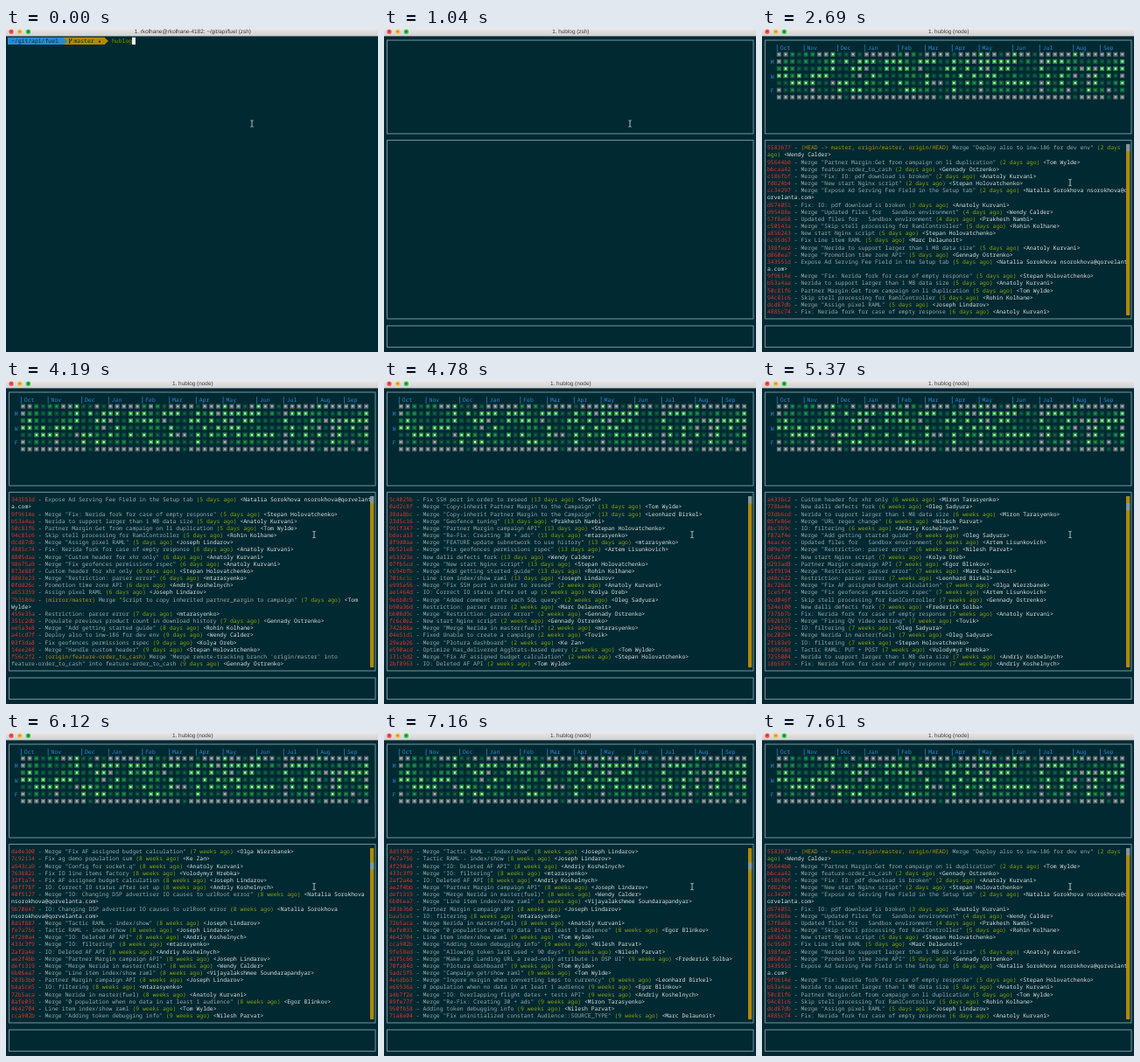
An HTML page for the animation above (8000 ms loop, 425 by 371 pixels).

```html
<!DOCTYPE html>
<html lang="en">
<head>
<meta charset="utf-8">
<title>hublog</title>
<style>
  html, body { margin: 0; width: 100%; height: 100%; overflow: hidden; background: #012932; }
  svg { display: block; width: 425px; height: 371px; }
  text { white-space: pre; text-rendering: geometricPrecision; }
  .mono { font: 6.42px "Noto Sans Mono", "DejaVu Sans Mono", monospace; }
  .bar { font: 6.4px "Liberation Sans", Arial, sans-serif; fill: #3c3c3c; text-anchor: middle; }
</style>
</head>
<body>
<svg viewBox="0 0 425 371" xmlns="http://www.w3.org/2000/svg">
  <defs>
    <linearGradient id="chrome" x2="0" y2="1">
      <stop stop-color="#eaeaea"/><stop offset="1" stop-color="#d0d0d0"/>
    </linearGradient>
  </defs>
  <rect width="425" height="371" fill="#012932"/>
  <rect width="425" height="9.4" fill="url(#chrome)"/>
  <circle cx="6" cy="4.2" r="2.7" fill="#fc5753"/>
  <circle cx="15.8" cy="4.2" r="2.7" fill="#fdbc40"/>
  <circle cx="25.4" cy="4.2" r="2.7" fill="#33c748"/>
  <path d="M5 3.2L7 5.2M7 3.2L5 5.2M14.4 4.2H17.2M24 4.2H26.8M25.4 2.8V5.6" stroke="#000" stroke-opacity=".55" stroke-width=".7"/>
  <text id="title" class="bar" x="213.3" y="6.3"></text>
  <g id="prompt" class="mono">
    <path d="M65 10.8H112.5L117 14.9L112.5 19H65Z" fill="#b58900"/>
    <path d="M2 10.8H65.5L70 14.9L65.5 19H2Z" fill="#268bd2"/>
    <g fill="#06303b">
      <text x="6" y="17">~/git/api/fuel</text>
      <text x="77.5" y="17">master</text>
      <text x="105" y="17">★</text>
    </g>
    <path d="M72.6 12V18M74.8 12V14L72.6 16" fill="none" stroke="#06303b" stroke-width=".9"/>
    <text x="121" y="17" fill="#859900">hublog</text>
    <rect id="caret" width="4" height="8.2" fill="#eef0ea"/>
  </g>
  <g id="panes" fill="none" stroke="#6b8d94" stroke-width="1.1">
    <rect x="3.5" y="14" width="418.5" height="107"/>
    <rect x="3.5" y="128.5" width="418.5" height="204.5"/>
    <rect x="3.5" y="341" width="418.5" height="24.5"/>
  </g>
  <g id="data" class="mono">
    <g id="grid"></g>
    <g id="log"></g>
    <rect x="416" y="133" width="4.2" height="196" fill="#b08a08"/>
    <rect id="thumb" x="416" width="4.2" height="8.17" fill="#7f97a0"/>
  </g>
  <path id="mouse" d="M-1.6 -3.6H-.5L0 -3L.5 -3.6H1.6M0 -3V3M-1.6 3.6H-.5L0 3L.5 3.6H1.6" fill="none" stroke="#dfe5e5" stroke-width=".8"/>
</svg>
<script>
const $ = id => document.getElementById(id);
const LOOP = 8000, PITCH = 7.69, ROW = 8.17, ROWS = 24, COLS = 107;

let seed = 41;
const rnd = () => (seed = (seed * 16807) % 2147483647) / 2147483647;
const pick = list => list[Math.floor(rnd() * list.length)];
const esc = s => s.replace(/&/g, '&amp;').replace(/</g, '&lt;').replace(/>/g, '&gt;');

const people = {
  WC: 'Wendy Calder', TW: 'Tom Wylde', GO: 'Gennady Ostrenko', AK: 'Anatoly Kurvani',
  SH: 'Stepan Holovatchenko', NS: 'Natalia Sorokhova nsorokhova@qorvelanta.com',
  PN: 'Prakhesh Nambi', RK: 'Rohin Kolhane', MD: 'Marc Delaunoit', JL: 'Joseph Lindarov',
  mt: 'mtarasyenko', AN: 'Andriy Koshelnych', KO: 'Kolya Oreb', OS: 'Oleg Sadyura',
  NP: 'Nilesh Parvat', EB: 'Egor Blinkov', AL: 'Artem Lisunkovich', TV: 'Tovik',
  OW: 'Olga Wierzbanek', KZ: 'Ke Zan', VH: 'Volodymyr Hrebka',
  VS: 'Vijayalakshmee Soundarapandyar', FS: 'Frederick Solba', LB: 'Leonhard Birkel',
  MT: 'Miron Tarasyenko'
};

// hash, subject ~ age ~ author; a leading * wraps the subject as a merge
const recent = `5583b77 (HEAD -> master, origin/master, origin/HEAD) *Deploy also to inw-186 for dev env~2 days~WC
95644b0 *Partner Margin:Get from campaign on li duplication~2 days~TW
bbcaa42 Merge feature-order_to_cash~2 days~GO
c186fbf *Fix: IO: pdf download is broken~2 days~AK
fdb24b4 *New start Nginx script~2 days~SH
cc34297 *Expose Ad Serving Fee Field in the Setup tab~2 days~NS
d574051 Fix: IO: pdf download is broken~3 days~AK
d95488e *Updated files for   Sandbox environment~4 days~WC
57f8e68 Updated files for   Sandbox environment~4 days~PN
c50143a *Skip stell processing for RamlController~5 days~RK
a856243 New start Nginx script~5 days~SH
6c95d67 Fix Line item RAML~5 days~MD
398fee2 *Nerida to support larger than 1 MB data size~5 days~AK
d860ea7 *Promotion time zone API~5 days~GO
343551d Expose Ad Serving Fee Field in the Setup tab~5 days~NS
9f9614e *Fix: Nerida fork for case of empty response~5 days~SH
b53a4aa Nerida to support larger than 1 MB data size~5 days~AK
50c81f6 Partner Margin:Get from campaign on li duplication~5 days~TW
94c81c6 Skip stell processing for RamlController~5 days~RK
dcd87db *Assign pixel RAML~5 days~JL
4885c74 Fix: Nerida fork for case of empty response~6 days~AK
8805daa *Custom header for xhr only~6 days~AK
98675a9 *Fix geofences permissions rspec~6 days~AK
873e88f Custom header for xhr only~6 days~SH
8083e23 *Restriction: parser error~6 days~mt
0fdd26c Promotion time zone API~6 days~AN
a653359 Assign pixel RAML~6 days~JL
79350de (mirror/master) *Script to copy inherited partner_margin to campaign~7 days~TW
459e35a Restriction: parser error~7 days~mt
351c2db Populate previous product count in download history~7 days~GO
ee5a3e8 *Add getting started guide~8 days~RK
a41cd7f Deploy also to inw-186 for dev env~9 days~WC
03f3da8 Fix geofences permissions rspec~9 days~KO
14ee248 *Handle custom header~9 days~SH
f56c2f2 (origin/feature-order_to_cash) Merge "Merge remote-tracking branch 'origin/master' into feature-order_to_cash" into feature-order_to_cash~9 days~GO`;

const middle = `00e642c Fixed Unable to create a campaign~4 weeks~AK
01563bb IO: Add "QRDC Last Updated Date" column~4 weeks~GO
fbf5840 Fixed SSO authorization~4 weeks~OS
f03afa7 Fixing the targer restrictions due to nerida~4 weeks~NP
533b267 Fix the SSO signin issue caused by nerida~4 weeks~NP
1ac443d *Fix SSH port in order to reseed~4 weeks~MD
9a6662f Dune new staging Colvaro endpoint~4 weeks~SH
cc03ee0 Fix SSH port in order to reseed~4 weeks~MD
19118a5 Tactic RAML: PUT + POST~4 weeks~JL
5f2bde9 Site targeting: remove duplicate values on backend validation~4 weeks~GO
5315f49 Optimize has_delivered AggStats-based query~4 weeks~KO
a2b714f New dalli defects fork~4 weeks~KO
dbcd086 *Applying Nerida on all actions of all controllers~5 weeks~NP
943535d *Added comment into each SQL query~5 weeks~OS
f4a1d4c *URL regex change~5 weeks~mt
8519682 *Fixing QV Video editing~5 weeks~EB
17ee3c3 *FEATURE update subnetwork to use history~5 weeks~RK
83a4a4f *Copy-inherit Partner Margin to the Campaign~5 weeks~JL
42d84bf Fixing QV Video editing~5 weeks~AL
31b7ad0 *QVX Pre-Bid Phase 2: Rate Card~5 weeks~AN
400dbc8 URL regex change~5 weeks~mt
b0be294 *Fix gateway for 204s~5 weeks~TV
176a2ab Fix gateway for 204s~5 weeks~TV
a19d94b *Geofence tuning~5 weeks~EB`;

const older = `da0e300 *Fix AF assigned budget calculation~7 weeks~OW
7c92114 Fix ag demo population sum~8 weeks~KZ
a543ca9 *Config for socket.q~8 weeks~AK
7638821 Fix IO line items factory~8 weeks~VH
32f1a74 Fix AF assigned budget calculation~8 weeks~JL
48ff78f IO: Correct IO status after set up~8 weeks~AN
40f5127 *IO: Changing DSP advertiser IO causes to urlRoot error~8 weeks~NS
9b70647 IO: Changing DSP advertiser IO causes to urlRoot error~8 weeks~NS
8d5f887 *Tactic RAML - index/show~8 weeks~JL
fe7a756 Tactic RAML - index/show~8 weeks~JL
4f290a4 *IO: Deleted AF API~8 weeks~AN
433c3f9 *IO: filtering~8 weeks~mt
2af2a4e IO: Deleted AF API~8 weeks~AN
ae2f4bb *Partner Margin campaign API~8 weeks~JL
def1319 *Merge Nerida in master(fuel)~8 weeks~WC
6b06ea7 *Line item index/show raml~8 weeks~VS
203b3b0 Partner Margin campaign API~8 weeks~JL
baa5ce5 IO: filtering~8 weeks~mt
72b5aca Merge Nerida in master(fuel)~8 weeks~AK
8afe031 *0 population when no data in at least 1 audience~8 weeks~EB
4642704 Line item index/show raml~9 weeks~TW
cca902b *Adding token debugging info~9 weeks~NP
9fe58ed *Allowing token last used < 90 days~9 weeks~NP
a3f5c66 *Make ads Landing URL a read-only attribute in DSP UI~9 weeks~FS
70fa84d *Plotura dashboard~9 weeks~TW
5adc5f5 *Campaign get/show raml~9 weeks~TW
4e6dbb3 *Ingore margin when converting imps to currency~9 weeks~LB
e66936a 0 population when no data in at least 1 audience~9 weeks~EB
a4b7f2e *IO: Overlapping flight dates + tests API~9 weeks~AN
89fe77f *Re-Fix: Creating 30 + ads~9 weeks~MT
950fb58 Adding token debugging info~9 weeks~NP
71a8e04 *Fix uninitialized constant Audience::SOURCE_TYPE~9 weeks~MD`;

const parse = block => block.split('\n').map(line => {
  const [head, age, who] = line.split('~');
  return { hash: head.slice(0, 7), subject: head.slice(8), age, who };
});

const RED = '#e0352f', GREY = '#9aa9a9', YELLOW = '#bd9008', GREEN = '#90a20c', PALE = '#dde2dc';

// One commit becomes rows of [char, colour] pairs
function rowsOf({ hash, subject, age, who }) {
  const refs = (subject.match(/^\((HEAD|origin|mirror)[^)]*\) /) || [''])[0];
  let rest = subject.slice(refs.length);
  if (rest[0] === '*') rest = `Merge "${rest.slice(1)}"`;
  const parts = [[hash, RED], [' - ', GREY], [refs, YELLOW], [rest + ' ', GREY],
    [`(${age} ago) `, GREEN], [`<${people[who]}>`, PALE]];
  let cells = parts.flatMap(([s, c]) => [...s].map(ch => [ch, c]));
  const rows = [];
  while (cells.length > COLS) {
    const space = cells.slice(0, COLS).map(c => c[0]).lastIndexOf(' ');
    const cut = space > COLS - 12 ? space + 1 : COLS;
    rows.push(cells.slice(0, cut));
    cells = cells.slice(cut);
  }
  return [...rows, cells];
}

const blocks = [recent, middle, older].map(parse);
const subjects = blocks.flat().map(c => c.subject).filter(s => s[0] !== '(' && s.length < 45);
const authors = Object.keys(people).filter(k => k !== 'NS' && k !== 'VS');
const filler = (n, ages) => Array.from({ length: n }, (_, i) => ({
  hash: Math.floor(rnd() * 0xfffffff).toString(16).padStart(7, '0'),
  subject: pick(subjects),
  age: ages[Math.floor(i / n * ages.length)],
  who: pick(authors)
}));

const rows = [
  ...blocks[0], ...filler(72, ['10 days', '11 days', '13 days', '2 weeks', '3 weeks', '4 weeks']),
  ...blocks[1], ...filler(48, ['5 weeks', '6 weeks', '7 weeks']),
  ...blocks[2], ...filler(34, ['9 weeks', '10 weeks'])
].flatMap(rowsOf);

function rowSvg(cells, i) {
  let out = '', last = '', run = '';
  const flush = () => { if (run) out += `<tspan fill="${last}">${esc(run)}</tspan>`; run = ''; };
  for (const [ch, colour] of cells) {
    if (colour !== last) { flush(); last = colour; }
    run += ch;
  }
  flush();
  return `<text x="6" y="${(139.2 + i * ROW).toFixed(2)}">${out}</text>`;
}

// [cell, centre] colours from no activity to most
const shades = [['#5f7073', '#b4bebe'], ['#07483b', '#127048'], ['#0c6b3e', '#2f9a50'], ['#2a9c42', '#e2f5da']];

function gridSvg() {
  const blue = '#268bd2';
  const months = 'Oct Nov Dec Jan Feb Mar Apr May Jun Jul Aug Sep'.split(' ');
  const weeks = [0, 4, 9, 13, 18, 22, 26, 30, 35, 39, 44, 48];
  let out = months.map((m, i) => {
    const x = 17.4 + weeks[i] * PITCH;
    return `<path d="M${x} 19V27" stroke="${blue}" stroke-width=".7"/>` +
      `<text x="${x + 3.4}" y="24.8" fill="${blue}">${m}</text>`;
  }).join('');
  ['M', 'W', 'F'].forEach((d, i) => {
    out += `<text x="9.8" y="${41.2 + i * 16.4}" fill="${blue}">${d}</text>`;
  });
  const square = (x, y, size, fill) =>
    `<rect x="${x - size / 2}" y="${y - size / 2}" width="${size}" height="${size}" fill="${fill}"/>`;
  for (let r = 0; r < 7; r++) for (let c = 0; c < 52; c++) {
    const idle = r === 0 ? (c < 12 ? .3 : .6) : r === 6 ? .9 : .06;
    const level = rnd() < idle ? 0 : pick([1, 1, 2, 3, 3]);
    const x = 19.4 + c * PITCH, y = 30.2 + r * ROW;
    out += square(x, y, 5, shades[level][0]) + square(x, y, 2, shades[level][1]);
  }
  return out;
}

const steps = {
  scroll: [[0, 0], [4190, 16], [4630, 40], [4780, 64], [4930, 88], [5070, 112], [5220, 136],
    [5370, 160], [6120, 184], [6260, 216], [6560, 224], [7160, 194], [7310, 110], [7460, 45], [7610, 0]],
  mouse: [[0, '281 109.5'], [1790, '310 126.5'], [1940, '352 173.5'], [2090, '352 177']],
  title: [[0, '1. rkolhane@rkolhane-4182: ~/git/api/fuel (zsh)'], [750, '1. hublog (zsh)'], [2690, '1. hublog (node)']]
};
const at = (list, t) => list.filter(s => s[0] <= t).pop()[1];
const show = (id, on) => $(id).setAttribute('visibility', on ? 'visible' : 'hidden');

$('grid').innerHTML = gridSvg();

let shown = -1;
function draw(t) {
  const top = at(steps.scroll, t);
  show('prompt', t < 1040);
  show('panes', t >= 1040);
  show('data', t >= 1490);
  $('title').textContent = at(steps.title, t);
  $('caret').setAttribute('x', t < 750 ? 144 : 2);
  $('caret').setAttribute('y', t < 750 ? 10.8 : 19);
  $('mouse').setAttribute('transform', `translate(${at(steps.mouse, t)})`);
  if (top !== shown) {
    shown = top;
    $('log').innerHTML = rows.slice(top, top + ROWS).map(rowSvg).join('');
    $('thumb').setAttribute('y', 133 + Math.floor(top / 92) * ROW);
  }
}

const start = performance.now();
function tick() {
  draw((performance.now() - start) % LOOP);
  requestAnimationFrame(tick);
}
tick();
</script>
</body>
</html>
```
